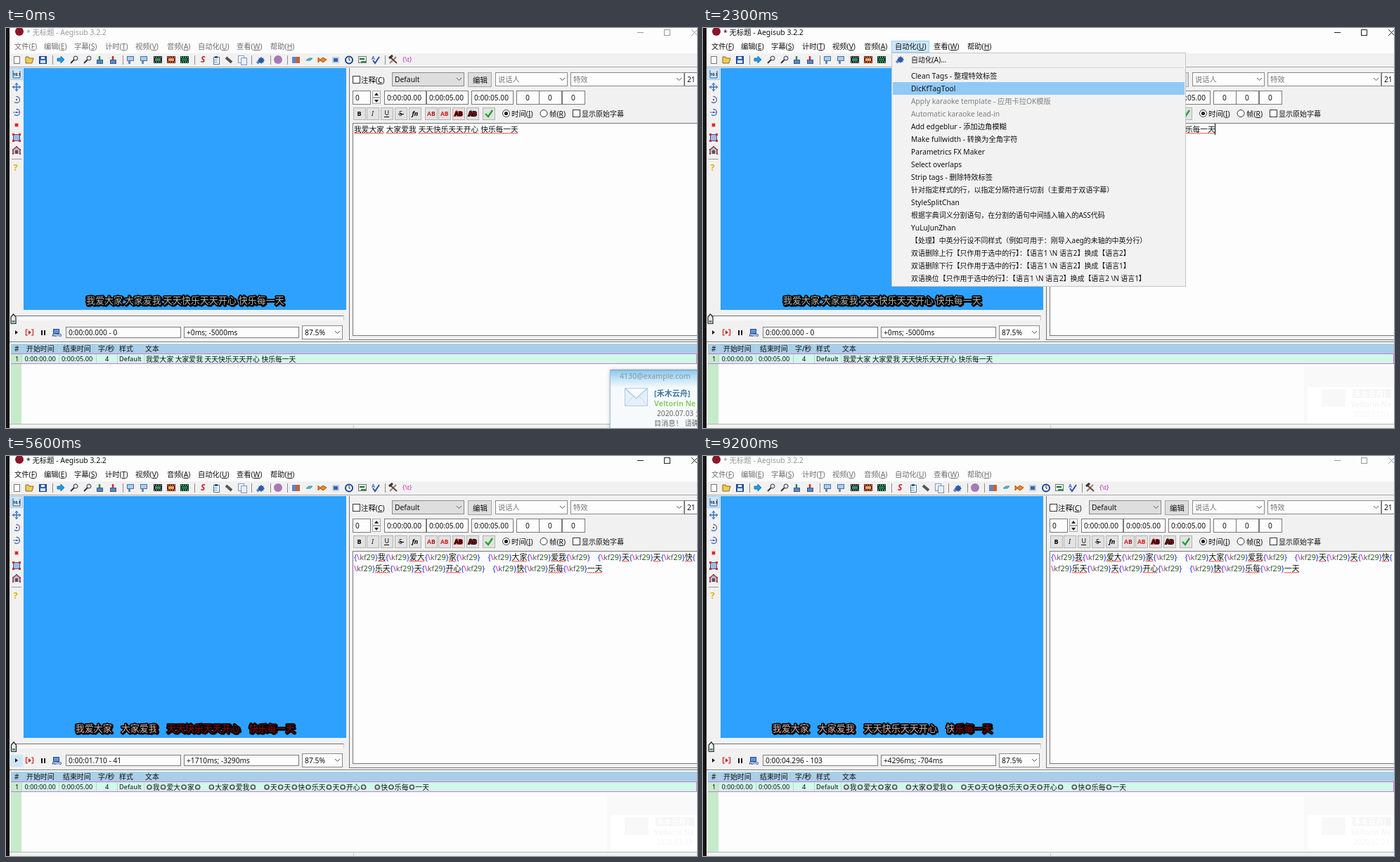
These frames come from a looping animation (983 px wide and 569 px high, 9.3 s). An HTML page with a canvas:

```html
<!DOCTYPE html>
<html lang="zh">
<head>
<meta charset="utf-8">
<title>Aegisub</title>
<style>
html, body { margin: 0; width: 100%; height: 100%; overflow: hidden; background: #f1f1f1; }
canvas { display: block; width: 983px; height: 569px; }
</style>
</head>
<body>
<canvas id="stage" width="983" height="569"></canvas>
<script>
const LOOP = 9300;
const SANS = '"Noto Sans", "Noto Sans CJK SC", "Noto Sans CJK", sans-serif';
const CJK = '"Noto Sans CJK SC", "Noto Sans CJK", sans-serif';
const c = document.getElementById('stage').getContext('2d');
c.fontKerning = 'none';

const PLAIN = '我爱大家 大家爱我 天天快乐天天开心 快乐每一天';
const SYLLABLES = '我,爱大,家,　,大家,爱我,　,天,天,快,乐天,天,开心,　,快,乐每,一天'.split(',');
const SYLLABLE_MS = 290;
const PLAYBACK = [[4000, 0], [4300, 6], [5600, 41], [7600, 93], [8000, 103]];
const MENU = ['自动化(A)...', 'Clean Tags - 整理特效标签', 'DicKfTagTool',
  'Apply karaoke template - 应用卡拉OK模版', 'Automatic karaoke lead-in',
  'Add edgeblur - 添加边角模糊', 'Make fullwidth - 转换为全角字符', 'Parametrics FX Maker',
  'Select overlaps', 'Strip tags - 删除特效标签',
  '针对指定样式的行，以指定分隔符进行切割（主要用于双语字幕）', 'StyleSplitChan',
  '根据字典词义分割语句，在分割的语句中间插入输入的ASS代码', 'YuLuJunZhan',
  '【处理】中英分行设不同样式（例如可用于：刚导入aeg的未轴的中英分行）',
  '双语删除上行【只作用于选中的行】：【语言1 \\N 语言2】换成【语言2】',
  '双语删除下行【只作用于选中的行】：【语言1 \\N 语言2】换成【语言1】',
  '双语换位【只作用于选中的行】：【语言1 \\N 语言2】换成【语言2 \\N 语言1】'];

function rect(x, y, w, h, fill, edge) {
  c.fillStyle = fill;
  c.fillRect(x, y, w, h);
  if (edge) {
    c.strokeStyle = edge;
    c.lineWidth = 1;
    c.strokeRect(x + .5, y + .5, w - 1, h - 1);
  }
}

function path(points, color, width = 1, fill) {
  c.beginPath();
  for (let i = 0; i < points.length; i += 2) c.lineTo(points[i], points[i + 1]);
  if (fill) {
    c.fillStyle = fill;
    c.fill();
  }
  if (color) {
    c.strokeStyle = color;
    c.lineWidth = width;
    c.stroke();
  }
}

function circle(x, y, r, fill, edge, width = 1) {
  c.beginPath();
  c.arc(x, y, r, 0, 7);
  if (fill) { c.fillStyle = fill; c.fill(); }
  if (edge) { c.strokeStyle = edge; c.lineWidth = width; c.stroke(); }
}

// Draws text centred on a row and returns its width.
function text(s, x, mid, size = 10.4, color = '#111', style = '', family = SANS) {
  c.font = `${style} ${size}px ${family}`;
  c.fillStyle = color;
  c.fillText(s, x, mid + size * .37);
  return c.measureText(s).width;
}

function mnemonic(s, x, mid, size, color) {
  text(s, x, mid, size, color);
  const start = c.measureText(s.slice(0, -2)).width;
  const width = c.measureText(s.slice(-2, -1)).width;
  rect(x + start, Math.round(mid + 5), width, 1, color);
}

function field(x, y, w, s, h = 20, edge = '#7a7a7a', fill = '#fdfdfd') {
  rect(x, y, w, h, fill, edge);
  text(s, x + 4, y + h / 2, 10.2);
}

function combo(x, y, w, s, color = '#111', fill = '#fdfdfd', edge = '#8a8a8a') {
  rect(x, y, w, 20, fill, edge);
  text(s, x + 4, y + 10, 10.3, color);
  path([x + w - 11, y + 8, x + w - 7.5, y + 11.5, x + w - 4, y + 8], '#555');
}

function checkbox(x, y) { rect(x, y, 11, 11, '#fff', '#333'); }

function squiggle(x, y, w) {
  const points = [];
  for (let i = 0; i <= w; i += 1.5) points.push(x + i, y + (points.length / 2 % 2 ? 1.5 : 0));
  path(points, '#f02020', .9);
}

function titleAndMenu(active, hover) {
  rect(5, 0, 978, 36, '#fdfdfd');
  circle(19, 5, 6, '#8c1626');
  text('* 无标题 - Aegisub 3.2.2', 29, 6, 10.4, active ? '#111' : '#999');
  const ink = active ? '#222' : '#999';
  rect(898, 6, 9, 1, ink);
  c.strokeStyle = ink;
  c.lineWidth = 1;
  c.strokeRect(936.5, 2.5, 8, 8);
  path([975, 2, 984, 11], ink);
  path([984, 2, 975, 11], ink);

  if (hover) rect(268, 18, 54, 17, '#cce8ff', '#99d1ff');
  const names = ['文件(F)', '编辑(E)', '字幕(S)', '计时(T)', '视频(V)', '音频(A)', '自动化(U)', '查看(W)', '帮助(H)'];
  const at = [12, 54, 97, 141, 184, 229, 273, 328, 376];
  names.forEach((s, i) => mnemonic(s, at[i], 26, 10.3, active ? '#111' : '#6d6d6d'));
}

function page(x, y, edge = '#4a76b0', fill = '#fff') {
  rect(x - 4, y - 5, 9, 11, fill, edge);
}

function magnifier(x) {
  path([x - 5, 50, x, 45], '#333', 2);
  circle(x + 2, 43, 3, '#d8e8f8', '#334');
}

function screen(x, y, fill) {
  rect(x - 5, y - 5, 10, 7, fill, '#4c6fa5');
  rect(x - 3, y + 2, 3, 4, '#6b87ad');
}

function film(x, fill, edge) {
  rect(x - 6, 40, 12, 10, edge);
  rect(x - 4, 43, 8, 4, fill);
  for (let i = 0; i < 4; i++) {
    rect(x - 5 + i * 3, 41, 1, 1, '#fff');
    rect(x - 5 + i * 3, 48, 1, 1, '#fff');
  }
}

function gear(x, y) {
  path([x - 5, y + 4, x - 1, y + 1], '#5b86cc', 4);
  circle(x + 1, y, 3, '#3a6cc0', '#2a55a8', 1.5);
  for (let a = 0; a < 6.2; a += Math.PI / 4)
    path([x + 1, y, x + 1 + 5 * Math.cos(a), y + 5 * Math.sin(a)], '#2a55a8', 1);
}

function toolbar() {
  rect(5, 36, 978, 20, '#f1f1f1');
  rect(5, 55, 978, 1, '#a8a8a8');
  [66, 166, 268, 349, 376, 400, 539].forEach(x => rect(x, 39, 1, 13, '#8c8c8c'));
  page(15, 45, '#777');
  path([28, 50, 28, 41, 32, 41, 33, 43, 39, 43, 37, 50, 28, 50], '#8a6a10', 1, '#f0cc58');
  rect(47, 40, 11, 11, '#2d63b5', '#173b77');
  rect(50, 41, 5, 3, '#e6eefa');
  rect(49, 46, 7, 4, '#dce6f4');
  path([73, 43, 78, 43, 78, 40, 83, 45, 78, 50, 78, 47, 73, 47, 73, 43], '#1678b8', 1, '#1c9be6');
  magnifier(97);
  magnifier(116);
  [133, 152].forEach((x, i) => {
    rect(x - 4, 45, 9, 6, '#5a86c4', '#35588e');
    path([x, 40, x, 45], i ? '#d22' : '#2a9040', 2.5);
  });
  screen(177, 45, '#a9cdf3');
  screen(196, 45, '#a9cdf3');
  film(216, '#2d9a50', '#223');
  film(235, '#f3a35a', '#6b2410');
  film(254, '#1d7a46', '#0a3c2a');
  text('S', 277, 45, 12, '#d02030', 'italic bold');
  page(299, 46);
  rect(297, 40, 4, 3, '#456');
  rect(296, 45, 5, 1, '#58a');
  rect(296, 48, 5, 1, '#58a');
  path([313, 42, 321, 49], '#555', 4);
  page(334, 44, '#7b96bd');
  page(338, 47, '#7b96bd', '#e8f0fa');
  gear(362, 46);
  circle(387, 45, 6, '#a679b5');
  rect(407, 41, 6, 9, '#6a7fc0');
  rect(413, 41, 5, 9, '#c8622c');
  path([427, 46, 431, 43, 436, 43, 433, 46, 427, 46], '#338fa0', 1, '#5ac0cc');
  path([444, 42, 447, 45, 451, 42, 456, 45, 451, 49, 447, 46, 444, 49, 444, 42], '#b94a10', 1, '#ef8424');
  rect(464, 41, 10, 9, '#bcd0ea');
  rect(466, 43, 6, 5, '#3d62a0');
  circle(488, 45.5, 5, '#fff', '#1c438f', 2);
  path([488, 42, 488, 46, 490, 46], '#222');
  rect(501, 40, 12, 10, '#e7eee7', '#777');
  path([503, 44, 510, 44], '#263', 2);
  path([505, 48, 512, 48], '#2a9040', 2);
  text('A', 520, 42, 7, '#36c', 'bold');
  path([522, 46, 525, 50, 531, 41], '#2850b0', 2);
  path([546, 50, 555, 41], '#888', 2);
  path([547, 42, 556, 50], '#7b3b20', 2);
  path([545, 43, 550, 39], '#333', 3);
  text('{\\t}', 564, 45, 9, '#c030b8');
}

function videoTools() {
  rect(6, 57, 18, 17, '#cfe6f8', '#9ccbee');
  path([10, 60, 10, 71, 20, 71], '#335a98');
  path([20, 61, 20, 71], '#335a98');
  text('10.1', 10, 66, 5.5, '#111', 'bold');
  path([10, 84, 20, 84], '#3a70c8', 1.5);
  path([15, 79, 15, 89], '#3a70c8', 1.5);
  for (let a = 0; a < 4; a++) {
    const dx = Math.round(Math.cos(a * Math.PI / 2)), dy = Math.round(Math.sin(a * Math.PI / 2));
    path([15 + 3 * dx + 2 * dy, 84 + 3 * dy + 2 * dx, 15 + 6 * dx, 84 + 6 * dy,
      15 + 3 * dx - 2 * dy, 84 + 3 * dy - 2 * dx], '#3a70c8');
  }
  c.strokeStyle = '#3a70c8';
  c.lineWidth = 1.3;
  [102, 120].forEach(y => {
    c.beginPath();
    c.arc(15, y, 4.5, -1.7, 2.3);
    c.stroke();
    rect(14, y - 1, 2, 2, '#d22');
  });
  path([10, 120, 20, 120], '#3a70c8');
  rect(12, 135, 6, 6, '#e32222', '#f6b0b0');
  rect(10, 151, 10, 10, '#9fbbe3', '#39589a');
  [[9, 150], [18, 150], [9, 159], [18, 159]].forEach(p => rect(...p, 3, 3, '#d22'));
  path([10, 179, 10, 173, 15, 169, 20, 173, 20, 179], '#39589a', 1.5, '#dfb0b0');
  [[9, 172], [14, 168], [19, 172], [9, 178], [19, 178]].forEach(p => rect(...p, 2, 2, '#d22'));
  rect(13, 174, 4, 5, '#456');
  rect(8, 186, 14, 1, '#999');
  text('?', 10.5, 198, 13, '#e5b300', 'bold');
}

function subtitle(tagged, ms) {
  const s = tagged ? SYLLABLES.join('') : PLAIN;
  const y = 391.8;
  const lit = '#b4b4ae';
  c.font = `13px ${CJK}`;
  const width = c.measureText(s).width;
  const x = 254.8 - width / 2;
  c.lineJoin = 'round';
  c.strokeStyle = '#000';
  c.lineWidth = 3.4;
  c.strokeText(s, x, y);
  c.strokeText(s, x + 1.2, y + 1.2);
  c.lineJoin = 'miter';
  c.font = `300 13px ${CJK}`;
  c.fillStyle = tagged ? '#980404' : lit;
  c.fillText(s, x, y);
  if (!tagged) return;
  const done = Math.floor(ms / SYLLABLE_MS);
  const part = ms / SYLLABLE_MS - done;
  const filled = 13 * (SYLLABLES.slice(0, done).join('').length + SYLLABLES[done].length * part);
  c.save();
  c.beginPath();
  c.rect(x, 376, filled, 24);
  c.clip();
  c.fillStyle = lit;
  c.fillText(s, x, y);
  c.restore();
}

function videoPanel(t, frame, ms, tagged) {
  rect(25, 57, 459, 344, '#2ea1ff');
  subtitle(tagged, ms);
  rect(10, 408, 470, 8, '#f8f8f8');
  rect(10, 409, 470, 1, '#6c6c6c');
  rect(480, 409, 1, 7, '#ccc');
  const x = 7 + frame * .012;
  path([x, 420.5, x, 411, x + 3.5, 407, x + 7, 411, x + 7, 420.5, x, 420.5], '#222', 1.2, '#e7ece7');
  rect(x + 1.5, 416, 4, 3, '#6a8a78');

  if (t >= 3900 && t < 8400) rect(6, 425, 18, 17, '#cfe6f8');
  path([13, 430, 17, 433, 13, 436, 13, 430], null, 1, '#111');
  path([31, 429, 28.5, 429, 28.5, 437, 31, 437], '#d02020', 1.2);
  path([36, 429, 38.5, 429, 38.5, 437, 36, 437], '#d02020', 1.2);
  path([32, 430, 36, 433, 32, 436, 32, 430], null, 1, '#d02020');
  rect(50, 430, 2, 7, '#111');
  rect(54, 430, 2, 7, '#111');
  rect(67, 428, 9, 7, '#5f94d6', '#234f91');
  text('AUTO', 65.5, 437, 4.8, '#1a3c90', 'bold');

  const stamp = '0:00:0' + (ms / 1000).toFixed(3);
  const edge = t >= 3300 && t < 3500 ? '#171717' : '#7a7a7a';
  field(85, 425, 164, `${stamp} - ${frame}`, 16, edge);
  field(253, 425, 164, `+${ms}ms; ${ms - 5000}ms`, 16);
  combo(421, 423, 58, '87.5%');
}

function formatButtons() {
  [494, 513, 533, 553, 573, 596, 615, 635, 655, 678].forEach(x => rect(x, 113, 18, 18, '#e2e2e2', '#b4b4b4'));
  text('B', 499.5, 122, 9, '#000', 'bold');
  text('I', 520, 122, 9, '#111', 'italic');
  text('U', 538.5, 121, 9, '#000');
  rect(538, 126, 7, 1, '#000');
  text('S', 559, 122, 9, '#000');
  rect(558, 122, 8, 1, '#000');
  text('fn', 577.5, 122, 9, '#000', 'italic bold');
  text('A', 599, 122, 8.5, '#e01818', 'bold');
  text('B', 605, 122, 8.5, '#a02020', 'bold');
  text('AB', 618, 122, 8.5, '#e01818', 'bold');
  outlinedAB(638, '#c01010', '#000');
  outlinedAB(658, '#000', '#a01010');
  path([682, 122, 686, 126, 692, 117], '#22a52c', 2.4);
}

function outlinedAB(x, edge, fill) {
  c.font = `bold 8.5px ${SANS}`;
  c.strokeStyle = edge;
  c.lineWidth = 2;
  c.strokeText('AB', x, 125.1);
  text('AB', x, 122, 8.5, fill, 'bold');
}

function editPanel(t, tagged) {
  rect(488, 57, 1, 386, '#777');
  rect(488, 443, 495, 1, '#777');
  checkbox(493, 68);
  mnemonic('注释(C)', 505, 74, 10.4, '#111');
  combo(549, 63, 103, 'Default', '#111', '#dedede');
  rect(657, 63, 34, 21, '#dedede', '#a6a6a6');
  text('编辑', 664, 74, 10.4);
  combo(696, 63, 103, '说话人', '#777');
  combo(803, 63, 162, '特效', '#777', '#fdfdfd', t >= 8900 && t < 9100 ? '#222' : '#8a8a8a');
  field(965, 63, 22, '21');

  field(493, 89, 26, '0');
  rect(521, 89, 12, 10, '#f5f5f5', '#aaa');
  rect(521, 99, 12, 9, '#f5f5f5', '#aaa');
  path([524, 96, 527, 92, 530, 96], null, 1, '#222');
  path([524, 102, 527, 106, 530, 102], null, 1, '#222');
  field(538, 89, 60, '0:00:00.00');
  field(598, 89, 60, '0:00:05.00');
  field(662, 89, 60, '0:00:05.00');
  [726, 758, 791].forEach(x => {
    rect(x, 89, 33, 20, '#fdfdfd', '#7a7a7a');
    text('0', x + 13, 99, 10.2);
  });

  formatButtons();
  circle(711.5, 121.5, 5, '#fff', '#333');
  circle(711.5, 121.5, 2.6, '#222');
  mnemonic('时间(I)', 719, 122, 10.4, '#111');
  circle(765, 121.5, 5, '#fff', '#333');
  mnemonic('帧(R)', 773, 122, 10.4, '#111');
  checkbox(806, 116);
  text('显示原始字幕', 819, 122, 10);

  rect(493, 135, 495, 303, '#fdfdfd', '#777');
  if (tagged) taggedLine();
  else plainLine();
  if (t >= 2300 && t < 2500) rect(728, 136, 1, 16, '#000');
}

function plainLine() {
  let x = 495;
  for (const word of PLAIN.split(' ')) {
    const w = text(word, x, 144, 10.7);
    squiggle(x, 149, w);
    x += w + c.measureText(' ').width + .3;
  }
}

function taggedLine() {
  let x = 495, y = 144;
  const put = (s, color) => { x += text(s, x, y, 10.82, color); };
  SYLLABLES.forEach((s, i) => {
    put('{', '#1432ff');
    if (i === 10) {
      x = 495;
      y = 160;
    }
    put('\\', '#ff00c8');
    put('kf', '#5a5a5a');
    put('29', '#285a28');
    put('}', '#1432ff');
    const start = x;
    put(s, '#111');
    if (s !== '　') squiggle(start, y + 5, x - start);
  });
}

// Each override tag shows as a ring in front of its syllable.
function ringedText(x, mid, size) {
  for (const s of SYLLABLES) {
    circle(x + size / 2, mid, 3, null, '#555', 1.7);
    x += size;
    x += text(s, x, mid, size, '#111', '', CJK);
  }
}

function grid(tagged) {
  rect(5, 446, 978, 1, '#777');
  rect(6, 447, 977, 117, '#fdfdfd');
  rect(7, 449, 976, 15, '#a8cfe7');
  rect(7, 464, 976, 14, '#cffae8');
  rect(7, 464, 15, 99, '#c5ebcb');
  [22, 75, 128, 158, 196].forEach(x => rect(x, 449, 1, 29, '#b5d6d4'));
  rect(7, 463, 976, 1, '#dd70d8');
  rect(7, 477, 976, 1, '#dd70d8');
  rect(982, 463, 1, 15, '#dd70d8');
  [['#', 12], ['开始时间', 29], ['结束时间', 81], ['字/秒', 131], ['样式', 161], ['文本', 198]].forEach(
    ([s, x]) => text(s, x, 456.5, 9.9));
  [['1', 13], ['0:00:00.00', 26.5], ['0:00:05.00', 79], ['4', 141], ['Default', 161]].forEach(
    ([s, x]) => text(s, x, 471, 9.2));
  if (tagged) ringedText(199, 471, 9.83);
  else text(PLAIN, 199, 471, 9.8);
  rect(5, 563, 978, 1, '#b5b5b5');
  rect(5, 564, 978, 5, '#f1f1f1');
  rect(494, 565, 1, 4, '#ccc');
}

function ghost() {
  rect(855, 483, 128, 80, '#f9f9f9');
  rect(860, 511, 123, 52, '#fff');
  rect(880, 514, 34, 25, '#f8f8f8');
  rect(923, 514, 56, 12, '#f5f5f5');
  text('[禾木云舟]', 922, 520, 10.6, '#fff', 'bold');
  text('Veltorin Ne', 922, 535, 10, '#f5f5f5', 'bold');
  text('2020.07.03', 925, 549, 10, '#f5f5f5');
}

function mailPopup(alpha) {
  c.save();
  c.globalAlpha = alpha;
  c.shadowColor = 'rgba(40,70,100,.55)';
  c.shadowBlur = 5;
  rect(860, 487, 130, 90, '#f7fafc');
  c.shadowBlur = 0;
  const shade = c.createLinearGradient(0, 487, 0, 512);
  shade.addColorStop(0, '#8ec9ec');
  shade.addColorStop(.6, '#cfe9f7');
  shade.addColorStop(1, '#f7fafc');
  rect(860, 487, 123, 25, shade);
  rect(859, 486, 124, 1, '#6d9dbb');
  rect(859, 486, 1, 83, '#a9bfcd');
  text('4130@example.com', 873, 495.5, 10.6, '#8296a8');
  rect(880, 512, 33, 26, '#e6f0fb', '#b0cbe6');
  path([881, 513, 896.5, 527, 912, 513], '#a9c6e4', 1.2, '#f8fbff');
  path([881, 537, 892, 524], '#c4d8ec');
  path([912, 537, 901, 524], '#c4d8ec');
  text('[禾木云舟]', 922, 520, 11, '#4479a4', 'bold');
  text('Veltorin Ne', 922, 534, 10.4, '#8ccc66', 'bold');
  text('2020.07.03 为', 926, 548.5, 10.2, '#666');
  text('目消息！ 请确', 922, 562.5, 10.2, '#666');
  c.restore();
}

function dropMenu(t) {
  rect(268, 35, 419, 333, '#f2f2f2', '#c4c4c4');
  const rowY = i => i ? 50.2 + 18 * i : 45;
  const picked = t >= 2100 ? 2 : t >= 1800 ? 1 : t >= 1700 ? 0 : -1;
  if (picked >= 0) rect(270, Math.round(rowY(picked) - 9), 415, 18, '#91c9f7');
  rect(296, 56, 388, 1, '#d6d6d6');
  gear(280, 45);
  MENU.forEach((s, i) => {
    const size = /^[A-Z]/.test(s) ? 10.25 : 9.95;
    text(s, 296, rowY(i), size, i === 3 || i === 4 ? '#808080' : '#111');
  });
}

function tooltip() {
  rect(13, 449, 144, 18, '#fdfdfd', '#858585');
  text('从该位置开始播放视频 (Ctrl-P)', 17, 458, 9.8, '#666');
}

function frameAt(t) {
  if (t <= PLAYBACK[0][0]) return 0;
  for (let i = 1; i < PLAYBACK.length; i++) {
    const [t0, f0] = PLAYBACK[i - 1], [t1, f1] = PLAYBACK[i];
    if (t <= t1) return Math.round(f0 + (f1 - f0) * (t - t0) / (t1 - t0));
  }
  return 103;
}

function draw(t) {
  const tagged = t >= 3100;
  const active = t >= 1300 && t < 9100 && !(t >= 2600 && t < 3000);
  const frame = frameAt(t);
  const ms = Math.round(frame * 1001 / 24);
  rect(0, 0, 983, 569, '#f1f1f1');
  rect(0, 0, 5, 569, '#141414');
  titleAndMenu(active, t >= 1300 && t < 2500);
  toolbar();
  videoTools();
  videoPanel(t, frame, ms, tagged);
  editPanel(t, tagged);
  grid(tagged);
  if (t >= 1300) ghost();
  if (t < 1500) mailPopup(1 - t / 1500);
  if (t >= 1500 && t < 2500) dropMenu(t);
  if (t >= 6400 && t < 8000) tooltip();
}

let shown = -1;
const begin = performance.now();
function tick() {
  const t = Math.floor((performance.now() - begin) % LOOP / 100) * 100;
  if (t !== shown) draw(shown = t);
  requestAnimationFrame(tick);
}
tick();
</script>
</body>
</html>
```
